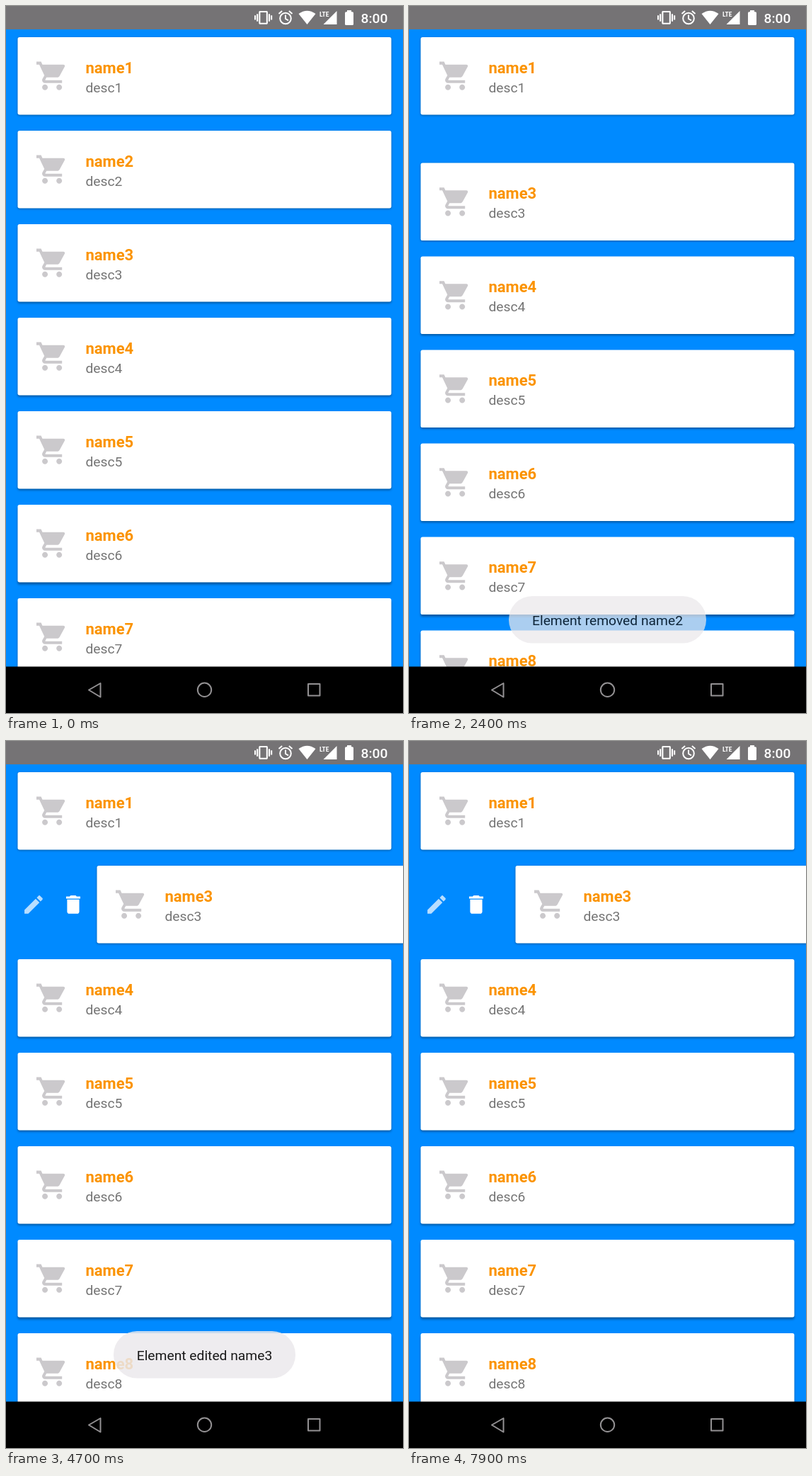
Write an HTML page that moves like this. It is 561 by 998 pixels and loops after 8 s.

```html
<!DOCTYPE html>
<html lang="en">
<head>
<meta charset="utf-8">
<title>Swipe list</title>
<style>
  html, body { margin: 0; width: 100%; height: 100%; overflow: hidden; background: #008aff; }
  svg { display: block; width: 561px; height: 998px; font-family: Roboto, sans-serif; }
  .name { font-size: 22px; font-weight: 700; fill: #fb9300; }
  .desc { font-size: 19.25px; fill: #757575; }
  .toast text { font-size: 19.25px; fill: #000; fill-opacity: .92; text-anchor: middle; }
  .toast rect { fill: #ebe9ec; fill-opacity: .87; }
  .nav { fill: none; stroke: #939193; stroke-width: 2; stroke-linejoin: round; }
</style>
</head>
<body>
<svg viewBox="0 0 561 998">
  <defs>
    <path id="cart" d="M7 18c-1.1 0-1.99.9-1.99 2S5.9 22 7 22s2-.9 2-2-.9-2-2-2zM1 2v2h2l3.6 7.59-1.35 2.45c-.16.28-.25.61-.25.96 0 1.1.9 2 2 2h12v-2H7.42c-.14 0-.25-.11-.25-.25l.03-.12.9-1.63h7.45c.75 0 1.41-.41 1.75-1.03l3.58-6.49c.08-.14.12-.31.12-.48 0-.55-.45-1-1-1H5.21l-.94-2H1zm16 16c-1.1 0-1.99.9-1.99 2s.89 2 1.99 2 2-.9 2-2-.9-2-2-2z"/>
    <path id="pencil" d="M3 17.25V21h3.75L17.81 9.94l-3.75-3.75L3 17.25zM20.71 7.04c.39-.39.39-1.02 0-1.41l-2.34-2.34c-.39-.39-1.02-.39-1.41 0l-1.83 1.83 3.75 3.75 1.83-1.83z"/>
    <path id="bin" d="M6 19c0 1.1.9 2 2 2h8c1.1 0 2-.9 2-2V7H6v12zM19 4h-3.5l-1-1h-5l-1 1H5v2h14V4z"/>
  </defs>
  <rect width="561" height="998" fill="#008aff"/>
  <g id="list"></g>
  <g id="toasts"></g>

  <g id="status" fill="#fff">
    <rect width="561" height="33" fill="#757375"/>
    <path transform="translate(351 3.8) scale(1.05)" d="M0 15h2V9H0v6zm3 2h2V7H3v10zm19-8v6h2V9h-2zm-3 8h2V7h-2v10zM16.5 3h-9C6.67 3 6 3.67 6 4.5v15c0 .83.67 1.5 1.5 1.5h9c.83 0 1.5-.67 1.5-1.5v-15c0-.83-.67-1.5-1.5-1.5zM16 19H8V5h8v14z"/>
    <g fill="none" stroke="#fff" stroke-width="2">
      <circle cx="395" cy="17.5" r="7.8"/>
      <path d="M395 12.5v5.5l4 2.4M385.5 11l4.6-4M404.500 11l-4.600-4"/>
    </g>
    <path d="M425.500 26L413.500 11Q425.500 2.500 437.500 11z"/>
    <text x="443" y="15" font-size="9.500" font-weight="700" style="font-family: 'Roboto Condensed', Roboto, sans-serif">LTE</text>
    <path d="M467.500 7V26H448.500z"/>
    <rect x="479" y="8.300" width="12" height="18.700" rx="1.500"/>
    <rect x="482" y="6" width="6" height="4"/>
    <text x="501.500" y="24" font-size="19.250" font-weight="500">8:00</text>
  </g>

  <rect y="932.500" width="561" height="66" fill="#000"/>
  <g class="nav">
    <path d="M117 965.500L133.500 956V975.500z"/>
    <circle cx="280.500" cy="965.300" r="9.700"/>
    <rect x="427" y="957" width="16.500" height="16.500"/>
  </g>
</svg>
<script>
const LOOP = 8000, STEP = 100, PITCH = 132, REVEAL = 112;
const NS = 'http://www.w3.org/2000/svg';
const $ = id => document.getElementById(id);
const clamp = v => Math.min(1, Math.max(0, v));

function group(parent, markup) {
  const g = document.createElementNS(NS, 'g');
  g.innerHTML = markup;
  parent.append(g);
  return g;
}

// Linear interpolation through [time, value] pairs
function track(t, points) {
  if (t <= points[0][0]) return points[0][1];
  for (let i = 1; i < points.length; i++) {
    const [t0, v0] = points[i - 1], [t1, v1] = points[i];
    if (t <= t1) return v0 + (v1 - v0) * (t - t0) / (t1 - t0);
  }
  return points[points.length - 1][1];
}

const rows = Array.from({ length: 8 }, (_, i) => {
  const n = i + 1;
  const root = group($('list'), `
    <g class="actions" fill="#fff">
      <use href="#pencil" transform="translate(21.800 213.800) scale(1.430) translate(0 -92.300)" opacity=".72"/>
      <use href="#bin" transform="translate(77.800 213.800) scale(1.430) translate(0 -92.300)"/>
    </g>
    <g class="card">
      <rect x="16.500" y="44" width="528" height="109.500" rx="2.700" fill="#fff"/>
      <use href="#cart" transform="translate(41 74.600) scale(2.010)" fill="#cbc9cc"/>
      <text class="name" x="112.500" y="94.500">name${n}</text>
      <text class="desc" x="112.500" y="121.500">desc${n}</text>
    </g>`);
  return {
    n, root,
    actions: root.querySelector('.actions'),
    card: root.querySelector('.card'),
    face: root.querySelector('rect')
  };
});

function makeToast(text, width, start, end) {
  const root = group($('toasts'), `
    <rect x="${280.5 - width / 2}" y="833" width="${width}" height="66.500" rx="33"/>
    <text x="280.500" y="873.500">${text}</text>`);
  root.setAttribute('class', 'toast');
  return { root, start, end };
}

const toasts = [
  makeToast('Element removed name2', 279, 2100, 3866),
  makeToast('Element edited name3', 257, 4280, 6080)
];

function toastAlpha(t, { start, end }) {
  const enter = clamp((t - start) / 500), leave = clamp((t - end) / 500);
  return (1 - (1 - enter) ** 2) * (1 - leave ** 2);
}

// A swipe overshoots before resting on the open position
const swipeOpen = t => track(t, [[0, 0], [100, 60], [200, 114], [300, 134], [400, 119], [500, REVEAL]]);
const swipeClosed = t => track(t, [[0, REVEAL], [100, 92], [200, 50], [300, 20], [400, 6], [500, 2], [600, 0]]);

function cardOffset(n, t) {
  if (n === 2) return swipeOpen(t - 400);
  if (n !== 3) return 0;
  if (t < 6600) return swipeOpen(t - 3000);
  return t < 7600 ? swipeClosed(t - 6600) : swipeOpen(t - 7600);
}

function render(t) {
  const collapse = (1 - Math.cos(Math.PI * clamp((t - 2250) / 250))) / 2;
  for (const { n, root, actions, card, face } of rows) {
    const y = PITCH * (n - 1 - (n > 2 ? collapse : 0));
    const x = cardOffset(n, t);
    root.setAttribute('transform', `translate(0 ${y})`);
    root.setAttribute('opacity', n === 2 ? clamp(1 - (t - 2108) / 120) : 1);
    card.setAttribute('transform', `translate(${x} 0)`);
    actions.setAttribute('opacity', clamp((x - 60) / 45));
    face.style.filter = `drop-shadow(0 ${1.5 + y / 400}px 1.8px rgba(0,0,0,.36))`;
  }
  for (const toast of toasts) toast.root.setAttribute('opacity', toastAlpha(t, toast));
}

const began = performance.now();
function tick() {
  const t = (performance.now() - began) % LOOP;
  render(Math.floor(t / STEP) * STEP);
  requestAnimationFrame(tick);
}
tick();
</script>
</body>
</html>
```
